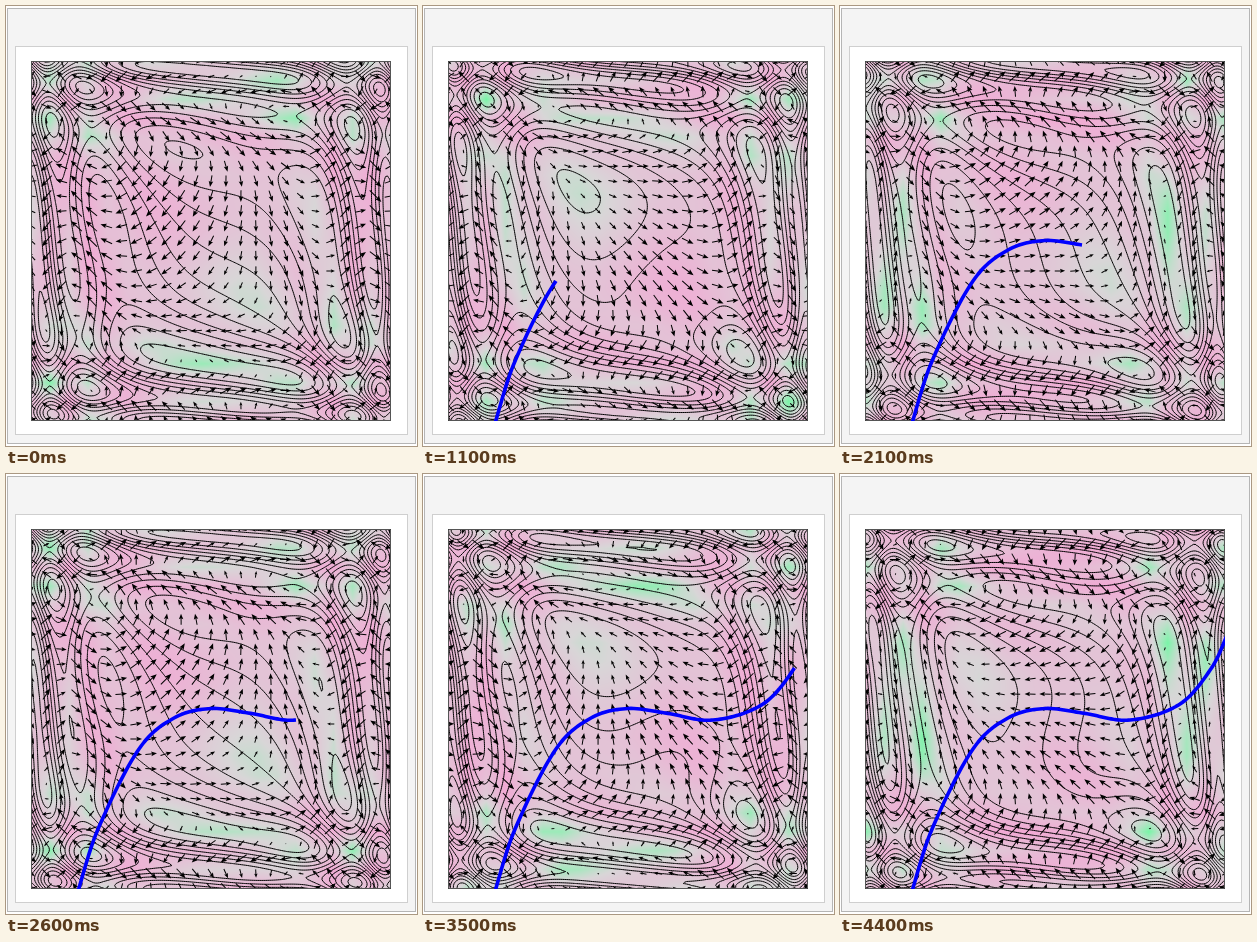
An HTML page with a canvas for the animation above (4.5 s loop, 411 by 440 pixels).

```html
<!DOCTYPE html>
<html lang="en">
<head>
<meta charset="utf-8">
<title>Particle in a moving field</title>
<style>
  html, body { margin: 0; width: 100%; height: 100%; overflow: hidden; background: #fff; }
  .panel, .card, canvas { position: absolute; box-sizing: border-box; }
  .panel { left: 1px; top: 2px; width: 409px; height: 436px; background: #f4f4f4; border: 1px solid #b5b5b5; }
  .card { left: 9px; top: 40px; width: 393px; height: 389px; background: #fff; border: 1px solid #cfcfcf; }
  canvas { left: 25px; top: 55px; }
</style>
</head>
<body>
<div class="panel"></div>
<div class="card"></div>
<canvas id="plot" width="360" height="360"></canvas>
<script>
const ctx = document.getElementById('plot').getContext('2d');
const SIZE = 360, MID = 179.5, UNIT = 89.75;
const STEP_MS = 100, STEPS = 45;
const PHASE = -0.47, PHASE_STEP = 5 / 44;
const LEVEL_GAP = 0.36, LEVEL_SHIFT = -0.022;
const CELL = 2, SAMPLES = 20, ARROWS = 25, ARROW_LEN = 16.5;
const LOW = [117, 247, 165], MIDDLE = [216, 214, 215], HIGH = [242, 168, 212];

// Particle path: step, x, y in plot pixels
const path = [
  [3, 39, 396], [4.3, 48, 359], [7, 67.5, 299], [11, 108, 220], [14.5, 143, 189],
  [18, 180, 179.5], [21, 217, 184], [26, 265, 191], [31, 315, 175], [35, 346.5, 139],
  [38, 363, 104], [39, 368, 90]
];

const angleA = (x, y, t) => x * x * x + y + t;
const angleB = (x, y, t) => y * y * y + x + t;
const height = (x, y, t) => Math.sin(angleA(x, y, t)) + Math.cos(angleB(x, y, t));
const field = (x, y, t) => [Math.sin(angleB(x, y, t)), -Math.cos(angleA(x, y, t))];
const toX = px => (px - MID) / UNIT;
const toY = py => (MID - py) / UNIT;
const mix = (a, b, k) => a + (b - a) * k;

// Values of f(px, py) on a square grid, row by row
function sample(count, gap, f) {
  return Array.from({ length: count }, (_, j) =>
    Array.from({ length: count }, (_, i) => f(i * gap, j * gap)));
}

const palette = Array.from({ length: 256 }, (_, i) => {
  const s = i / 127.5;
  const [from, to, k] = s < 1 ? [LOW, MIDDLE, s] : [MIDDLE, HIGH, s - 1];
  return from.map((c, j) => mix(c, to[j], k));
});

const image = ctx.createImageData(SIZE, SIZE);

// The field strength is sampled coarsely and blended between samples
function drawDensity(t) {
  const gap = 2 * MID / (SAMPLES - 1);
  const norms = sample(SAMPLES, gap, (px, py) => Math.hypot(...field(toX(px), toY(py), t)));
  let p = 0;
  for (let y = 0; y < SIZE; y++) {
    const j = Math.min(Math.floor(y / gap), SAMPLES - 2), ky = y / gap - j;
    for (let x = 0; x < SIZE; x++) {
      const i = Math.min(Math.floor(x / gap), SAMPLES - 2), kx = x / gap - i;
      const norm = mix(mix(norms[j][i], norms[j][i + 1], kx),
                       mix(norms[j + 1][i], norms[j + 1][i + 1], kx), ky);
      const color = palette[Math.round(255 * norm / Math.SQRT2)];
      image.data[p++] = color[0];
      image.data[p++] = color[1];
      image.data[p++] = color[2];
      image.data[p++] = 255;
    }
  }
  ctx.putImageData(image, 0, 0);
}

function traceCell(i, j, corners) {
  const low = Math.ceil((Math.min(...corners) - LEVEL_SHIFT) / LEVEL_GAP);
  const high = Math.floor((Math.max(...corners) - LEVEL_SHIFT) / LEVEL_GAP);
  const cornerX = [0, 1, 1, 0], cornerY = [0, 0, 1, 1];
  for (let n = low; n <= high; n++) {
    const level = LEVEL_SHIFT + n * LEVEL_GAP;
    let count = 0;
    for (let e = 0; e < 4; e++) {
      const f = (e + 1) % 4, a = corners[e], b = corners[f];
      if ((a < level) === (b < level)) continue;
      const k = (level - a) / (b - a);
      const x = (i + mix(cornerX[e], cornerX[f], k)) * CELL + 0.5;
      const y = (j + mix(cornerY[e], cornerY[f], k)) * CELL + 0.5;
      if (count++ % 2) ctx.lineTo(x, y);
      else ctx.moveTo(x, y);
    }
  }
}

function drawContours(t) {
  const n = SIZE / CELL;
  const grid = sample(n + 1, CELL, (px, py) => height(toX(px), toY(py), t));
  ctx.beginPath();
  for (let j = 0; j < n; j++) {
    for (let i = 0; i < n; i++) {
      traceCell(i, j, [grid[j][i], grid[j][i + 1], grid[j + 1][i + 1], grid[j + 1][i]]);
    }
  }
  ctx.strokeStyle = '#000';
  ctx.lineWidth = 1;
  ctx.stroke();
}

function drawArrow(px, py, u, v) {
  const len = ARROW_LEN * Math.hypot(u, v) / Math.SQRT2;
  if (len < 0.6) return;
  const head = Math.min(6.5, len * 0.5), wide = head * 0.4;
  ctx.save();
  ctx.translate(px + 0.5, py + 0.5);
  ctx.rotate(Math.atan2(-v, u));
  ctx.beginPath();
  ctx.moveTo(-len / 2, 0);
  ctx.lineTo(len / 2 - head * 0.7, 0);
  ctx.stroke();
  ctx.beginPath();
  ctx.moveTo(len / 2, 0);
  ctx.lineTo(len / 2 - head, wide);
  ctx.lineTo(len / 2 - head * 0.8, 0);
  ctx.lineTo(len / 2 - head, -wide);
  ctx.fill();
  ctx.restore();
}

function drawArrows(t) {
  ctx.fillStyle = ctx.strokeStyle = '#000';
  ctx.lineWidth = 1;
  sample(ARROWS, 2 * MID / (ARROWS - 1), (px, py) =>
    drawArrow(px, py, ...field(toX(px), toY(py), t)));
}

function slope(k, axis) {
  const a = path[Math.max(k - 1, 0)], b = path[Math.min(k + 1, path.length - 1)];
  return (b[axis] - a[axis]) / (b[0] - a[0]);
}

// Cubic Hermite interpolation between path points
function position(s) {
  let k = 0;
  while (k < path.length - 2 && s > path[k + 1][0]) k++;
  const a = path[k], b = path[k + 1], h = b[0] - a[0], q = (s - a[0]) / h;
  return [1, 2].map(axis =>
    a[axis] * (1 + 2 * q) * (1 - q) ** 2 + h * slope(k, axis) * q * (1 - q) ** 2 +
    b[axis] * q * q * (3 - 2 * q) + h * slope(k + 1, axis) * q * q * (q - 1));
}

function drawPath(step) {
  const start = path[0][0], end = Math.min(step, path[path.length - 1][0]);
  if (step <= 4) return;
  ctx.beginPath();
  for (let s = start; s < end; s += 0.25) ctx.lineTo(...position(s));
  ctx.lineTo(...position(end));
  ctx.strokeStyle = '#00f';
  ctx.lineWidth = 3.6;
  ctx.lineJoin = 'round';
  ctx.stroke();
}

function draw(step) {
  const t = PHASE + step * PHASE_STEP;
  drawDensity(t);
  drawContours(t);
  drawArrows(t);
  ctx.strokeStyle = '#555';
  ctx.lineWidth = 1;
  ctx.strokeRect(0.5, 0.5, SIZE - 1, SIZE - 1);
  drawPath(step);
}

const begin = performance.now();
let shown = -1;

function tick() {
  const step = Math.floor(Math.max(0, performance.now() - begin) / STEP_MS) % STEPS;
  if (step !== shown) draw(shown = step);
  requestAnimationFrame(tick);
}
tick();
</script>
</body>
</html>
```
